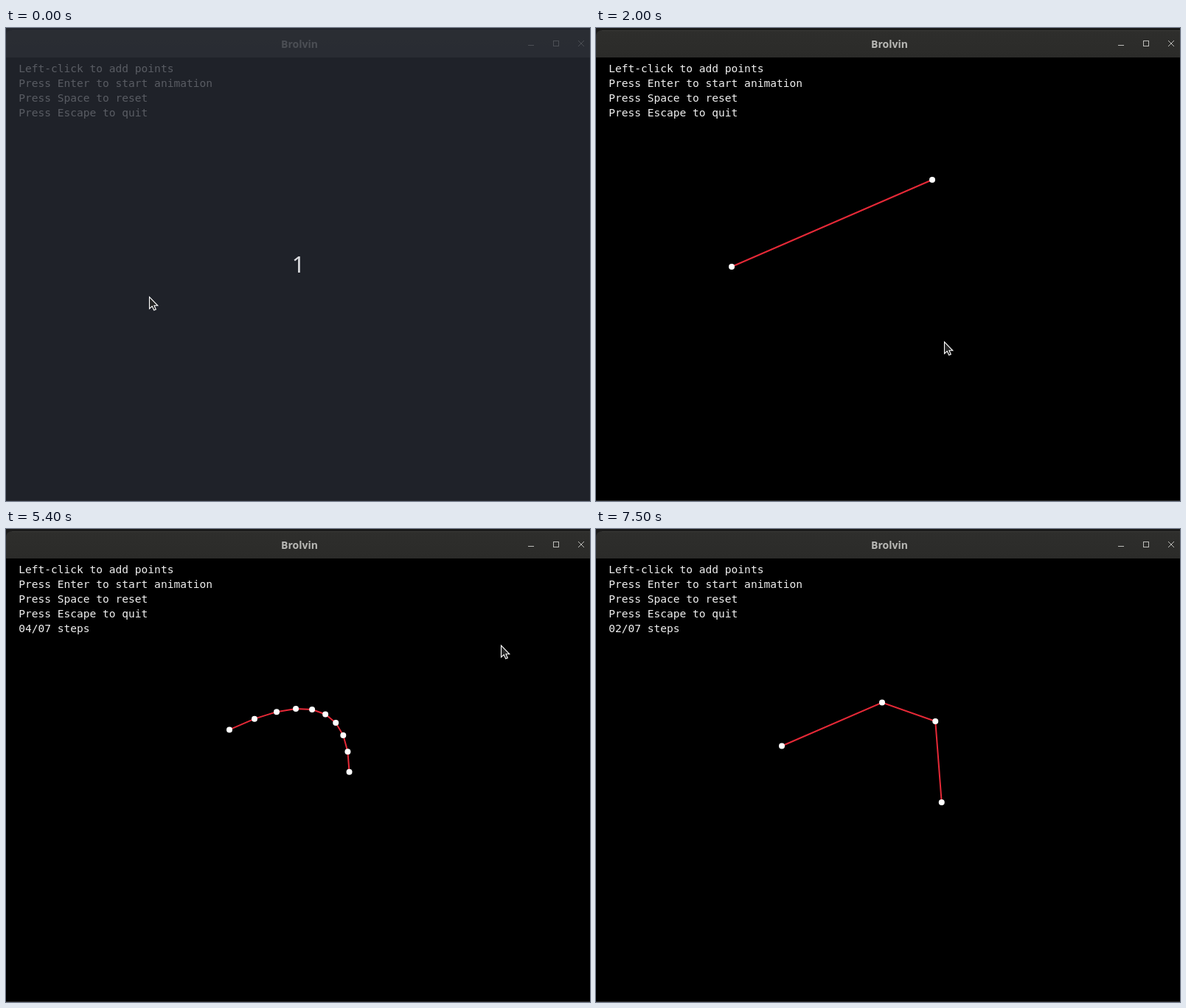
Recreate the animation shown at these times as an HTML page with a canvas. Size 792 by 642 pixels, loop 8000 ms.

```html
<!DOCTYPE html>
<html lang="en">
<head>
<meta charset="utf-8">
<title>Corner cutting</title>
<style>
  html, body { margin: 0; width: 100%; height: 100%; overflow: hidden; background: #000; }
  canvas { display: block; }
</style>
</head>
<body>
<canvas id="stage" width="792" height="642"></canvas>
<script>
const ctx = document.getElementById('stage').getContext('2d');
const W = 792, H = 642, LOOP = 8000, TICK = 100;

const HELP = [
  'Left-click to add points',
  'Press Enter to start animation',
  'Press Space to reset',
  'Press Escape to quit'
];

// One click every 900 ms, then one smoothing step about every half second
const POINTS = [[184, 324], [456, 206], [473, 426]];
const CLICK_START = 600, CLICK_GAP = 900;
const STEPS = 7, STEP_START = 3395, STEP_GAP = 502;

// Each stroke of the hand starts where the last one ended; via bends its path
const HOME = [194, 364];
const MOVES = [
  { start: 0, end: 500, via: [180, 339], to: [183, 322] },
  { start: 800, end: 1200, to: [455, 204] },
  { start: 1600, end: 2000, to: [472, 425] },
  { start: 5100, end: 5800, via: [629, 250], to: [759, 3] },
  { start: 5900, end: 6000, to: [762, -8] }
];
const POINTER_GONE = 6100;

const mix = (a, b, k) => a + (b - a) * k;
const between = (p, q, k) => [mix(p[0], q[0], k), mix(p[1], q[1], k)];
const easeOut = k => 1 - (1 - k) ** 2;
const ticksSince = (t, start, gap) => Math.max(0, Math.floor((t - start) / gap) + 1);

function cutCorners(pts) {
  const out = [];
  for (let i = 1; i < pts.length; i++) {
    out.push(between(pts[i - 1], pts[i], 0.25), between(pts[i - 1], pts[i], 0.75));
  }
  return out;
}

const shapes = [POINTS];
while (shapes.length < STEPS) shapes.push(cutCorners(shapes[shapes.length - 1]));

function rect(x, y, w, h, fill) {
  ctx.fillStyle = fill;
  ctx.fillRect(x, y, w, h);
}

function text(str, x, y, font, fill, align = 'left') {
  ctx.font = font;
  ctx.fillStyle = fill;
  ctx.textAlign = align;
  ctx.fillText(str, x, y);
}

function trace(pts) {
  ctx.beginPath();
  pts.forEach(p => ctx.lineTo(p[0], p[1]));
}

function drawWindow() {
  rect(0, 0, W, H, '#000');
  rect(0, 0, W, 40, '#1b1b1b');
  const bar = ctx.createLinearGradient(0, 3, 0, 40);
  bar.addColorStop(0, '#2e2e2c');
  bar.addColorStop(1, '#2b2b29');
  ctx.fillStyle = bar;
  ctx.beginPath();
  ctx.roundRect(0, 3, W + 10, 37, [8, 0, 0, 0]);
  ctx.fill();
  rect(8, 3, W - 8, 1, '#3a3a38');
  rect(0, H - 1, W, 1, '#2c2c2c');
  text('Brolvin', 398, 27, 'bold 14px "Open Sans", sans-serif', '#b8b8b5', 'center');

  const ink = '#bdbdba';
  rect(708, 23, 8, 1, ink);
  ctx.strokeStyle = ink;
  ctx.lineWidth = 1;
  ctx.strokeRect(742.5, 17.5, 7, 7);
  for (const side of [-1, 1]) {
    trace([[780 - 4 * side, 17], [780 + 4 * side, 25]]);
    ctx.stroke();
  }
}

function drawLabel(str, row) {
  text(str, 17.2, 60 + row * 20, '14.55px "DejaVu Sans Mono", monospace', '#f0f0f0');
}

function drawCurve(pts) {
  ctx.strokeStyle = '#e62937';
  ctx.lineWidth = 2;
  trace(pts);
  ctx.stroke();
  ctx.fillStyle = '#fff';
  for (const [x, y] of pts) {
    ctx.beginPath();
    ctx.arc(x, y, 4, 0, Math.PI * 2);
    ctx.fill();
  }
}

function drawCountdown() {
  rect(0, 0, W, H, 'rgba(41, 45, 54, 0.76)');
  text('1', 396.5, 332, '31px "Noto Sans", sans-serif', '#dcdde0', 'center');
}

function pointerAt(t) {
  let pos = HOME;
  for (const { start, end, via, to } of MOVES) {
    if (t < start) break;
    const k = easeOut(Math.min(1, (t - start) / (end - start)));
    const bend = via || between(pos, to, 0.5);
    pos = between(between(pos, bend, k), between(bend, to, k), k);
  }
  return pos.map(Math.round);
}

function drawPointer(t) {
  const [x, y] = pointerAt(t);
  ctx.save();
  ctx.translate(x, y);
  trace([[0.5, 1], [0.5, 17], [4.2, 13.7], [6.7, 19], [9.3, 17.9], [7, 12.8], [11.8, 12.8]]);
  ctx.closePath();
  ctx.fillStyle = '#262626';
  ctx.fill();
  ctx.strokeStyle = '#fff';
  ctx.lineWidth = 1.1;
  ctx.stroke();
  ctx.restore();
}

function draw(t) {
  drawWindow();
  HELP.forEach(drawLabel);

  const count = ticksSince(t, STEP_START, STEP_GAP);
  if (count) {
    const step = (count - 1) % STEPS;
    drawLabel(`0${step + 1}/0${STEPS} steps`, HELP.length);
    drawCurve(shapes[step]);
  } else {
    drawCurve(POINTS.slice(0, ticksSince(t, CLICK_START, CLICK_GAP)));
  }

  if (t < TICK) drawCountdown();
  if (t < POINTER_GONE) drawPointer(t);
}

const start = performance.now();
function loop() {
  const t = (performance.now() - start) % LOOP;
  draw(Math.floor(t / TICK) * TICK);
  requestAnimationFrame(loop);
}
loop();
</script>
</body>
</html>
```
